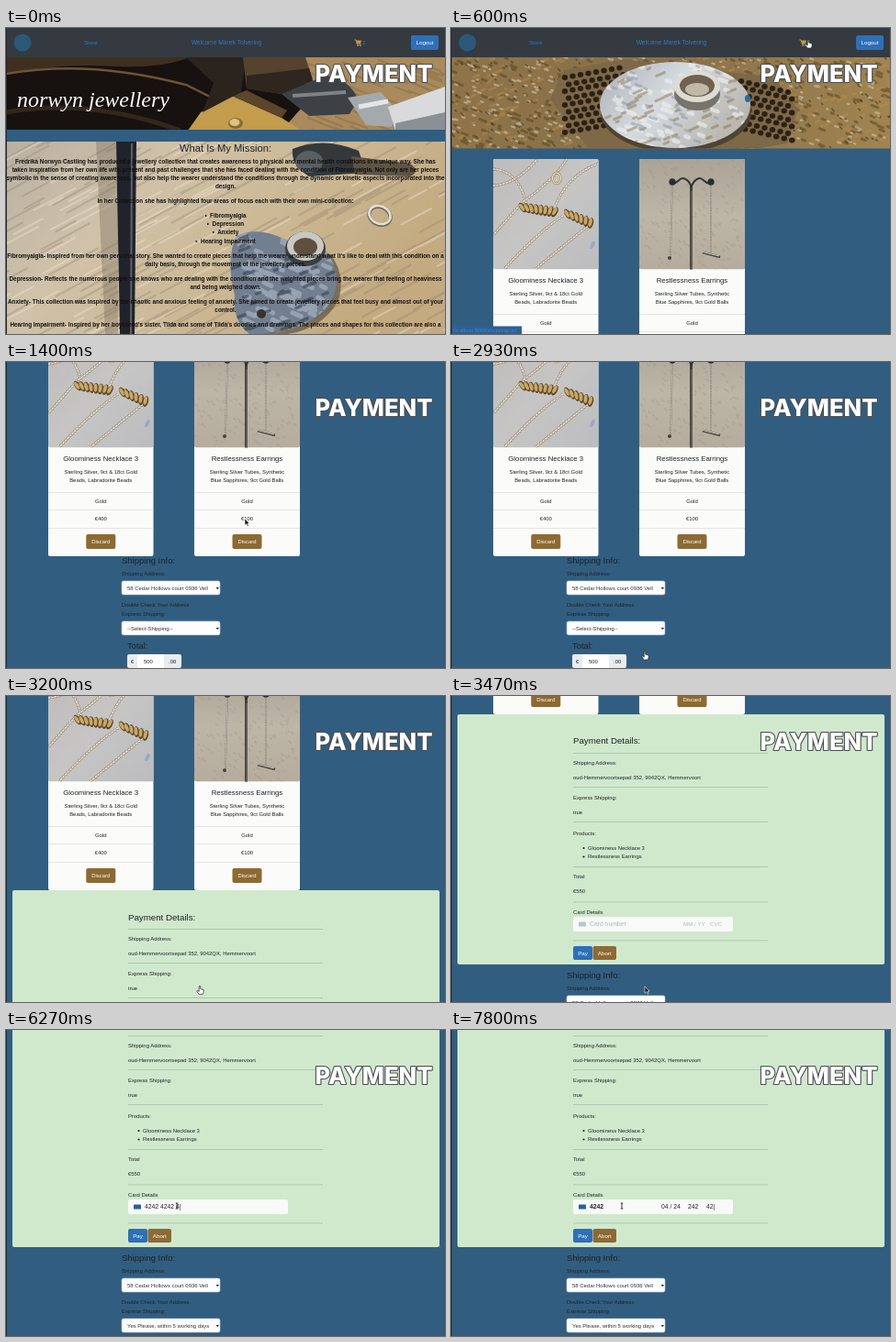
Recreate the animation shown at these times as an HTML page. Size 478 px wide and 334 px high, loop 8000 ms.

```html
<!DOCTYPE html>
<html lang="en">
<head>
<meta charset="utf-8">
<title>Checkout demo</title>
<style>
  html, body { margin: 0; width: 100%; height: 100%; overflow: hidden; background: #315e80; }
  svg { display: block; width: 100%; height: 100%; font-family: "Liberation Sans", sans-serif; }
  text { white-space: pre; }
</style>
</head>
<body>
<svg id="stage" viewBox="0 0 478 334"></svg>
<script>
const LOOP = 8000, STEP = 200 / 3;
const BLUE = '#315e80', BUTTON = '#2d70b8', BROWN = '#8d6a33', INK = '#1d2226';

// Markup helpers; text is placed by its vertical middle.
const text = (x, y, s, size = 5.9, attrs = '') =>
  `<text x="${x}" y="${y + size * 0.36}" font-size="${size}" ${attrs}>${s}</text>`;
const mid = (x, y, s, size, attrs = '') => text(x, y, s, size, `text-anchor="middle" ${attrs}`);
const rect = (x, y, w, h, fill, attrs = '') =>
  `<rect x="${x}" y="${y}" width="${w}" height="${h}" fill="${fill}" ${attrs}/>`;
const oval = (x, y, rx, ry, fill, attrs = '') =>
  `<ellipse cx="${x}" cy="${y}" rx="${rx}" ry="${ry}" fill="${fill}" ${attrs}/>`;
const shape = (d, fill, attrs = '') => `<path d="${d}" fill="${fill}" ${attrs}/>`;
const line = (d, color, width, attrs = '') => shape(d, 'none', `stroke="${color}" stroke-width="${width}" ${attrs}`);
const button = (x, y, w, h, label, fill, size = 5.9) =>
  rect(x, y, w, h, fill, 'rx="2"') + mid(x + w / 2, y + h / 2, label, size, 'fill="#fff"');
const group = (id, body, attrs = '') => `<g id="${id}" ${attrs}>${body}</g>`;
const clipped = (id, body) => `<g clip-path="url(#${id})">${body}</g>`;
const gradient = (id, dir, ...colors) => `<linearGradient id="${id}" ${dir}>` +
  colors.map((c, i) => `<stop offset="${i / (colors.length - 1)}" stop-color="${c}"/>`).join('') + '</linearGradient>';
const clip = (id, area) => `<clipPath id="${id}">${area}</clipPath>`;

function random(seed) {
  return () => (seed = (seed * 16807) % 2147483647) / 2147483647;
}
// Strokes of random length scattered over an area, for grain and mottling.
function strokes(seed, count, [x, y, w, h], [dx, dy], width, color, opacity) {
  const rnd = random(seed * 7919);
  let d = '';
  for (let i = 0; i < count; i++) {
    const k = 0.3 + rnd();
    d += `M${(x + rnd() * w).toFixed(1)} ${(y + rnd() * h).toFixed(1)}l${(dx * k).toFixed(1)} ${(dy * k).toFixed(1)}`;
  }
  return line(d, color, width, `opacity="${opacity}" stroke-linecap="round"`);
}

const header = rect(0, 0, 478, 32, '#343a40') +
  oval(18, 16, 9.5, 9.5, '#2c5878') +
  text(85, 16, 'Store', 6.1, 'fill="#2b7cc9"') +
  mid(240, 16, 'Welcome Marek Tolvering', 6.7, 'fill="#2b7cc9"') +
  line('M379.5 13h1.5l1.5 5h4', '#b8a25a', 1) + shape('M381.5 13.5h5.5l-1 3.5h-3.7z', '#c79a35') +
  oval(383, 19.3, 0.8, 0.8, '#c9b36a') + oval(386, 19.3, 0.8, 0.8, '#c9b36a') +
  text(388, 16, '2', 6, 'fill="#2b7cc9"') +
  button(441, 8, 30, 16, 'Logout', BUTTON, 6.2);

const workshopBanner = clipped('bannerA', rect(0, 32, 478, 80, '#17120f') +
  shape('M0 32H200Q170 44 120 42Q60 38 0 50Z', '#3f2f20') + line('M0 50Q90 34 196 62L240 84', '#6d5433', 2.5) +
  line('M0 92Q90 76 190 112', '#33271c', 5) +
  shape('M318 32H478V112H300L330 78Z', '#a98a5c') +
  strokes(3, 60, [320, 32, 158, 80], [30, 12], 2, '#7d6340', 0.4) +
  shape('M198 112L212 92L246 74L300 98L322 112Z', '#c39c4c') + shape('M246 74L300 98L306 90L262 68Z', '#5b452b') +
  shape('M196 32H262L256 70L214 92L226 60Z', '#2b231d') +
  shape('M258 32H326L334 56L300 72L262 66Z', '#55432f') + shape('M262 52L330 44L334 58L300 72L262 66Z', '#2e261f') +
  oval(250, 104, 8, 6, '#8a6c35') + oval(249, 103, 5.5, 4, '#dcc383') +
  shape('M300 72L348 52Q372 54 384 78L374 94L330 96Z', '#3d4146') + line('M312 74L370 70', '#7d8286', 4) +
  shape('M372 76L408 70L424 88L420 108L392 106Z', '#a4a9ae') + line('M384 86L416 80', '#e4e6e8', 5) +
  shape('M416 86L478 64V112H424Z', '#d9dadb') + shape('M424 104L478 92V112H424Z', '#8b9097') +
  text(12, 77, 'norwyn jewellery', 24, 'fill="#fff" font-family="Liberation Serif, serif" font-style="italic"'));

const PENDANT = 'M251 227Q274 216 302 230L348 243Q364 262 358 290Q346 318 312 328L268 336Q246 322 249 292Q239 250 251 227Z';
const woodPhoto = rect(0, 124, 478, 210, 'url(#wood)') + clipped('photoWood',
  strokes(11, 130, [-30, 124, 508, 250], [55, -30], 2.2, '#8d7d68', 0.32) +
  strokes(12, 110, [-30, 124, 508, 250], [45, -24], 2, '#efe5d2', 0.4) +
  shape('M98 124H122V334H108Z', '#6d6253', 'opacity=".35"') +
  shape('M120 124H142L140 334H124Z', '#20232b') + line('M137 126L136 334', '#5d626b', 2) +
  shape('M312 132Q346 118 384 134L392 158L330 162Q310 150 312 132Z', '#33383b') +
  oval(330, 146, 15, 12, '#596064') + shape('M376 140L440 148Q452 156 440 162L380 160Z', '#5e5444') +
  shape(PENDANT, '#4d4438', 'transform="translate(5 4)" opacity=".6"')) +
  shape(PENDANT, '#727f90') + clipped('pendant',
  strokes(5, 75, [246, 222, 110, 110], [9, 4], 5, '#b3bfcc', 0.55) +
  strokes(6, 50, [246, 222, 110, 110], [8, -3], 3.5, '#38424f', 0.6)) +
  oval(326, 241, 22, 19, '#3b3e40') + oval(326, 238, 20, 16, '#c9c8c1') + oval(326, 239, 13, 10, '#5d503f') +
  oval(278, 312, 5, 5, '#37332e') +
  oval(407, 205, 12, 9.5, 'none', 'stroke="#6f695f" stroke-width="4" transform="rotate(25 407 205)"') +
  oval(407, 204, 12, 9.5, 'none', 'stroke="#e2e0d8" stroke-width="2.6" transform="rotate(25 407 204)"');

const missionLines = [
  [148, 'Fredrika Norwyn Castling has produced a jewellery collection that creates awareness to physical and mental health conditions in a unique way. She has'],
  [157, 'taken inspiration from her own life with present and past challenges that she has faced dealing with the condition of Fibromyalgia. Not only are her pieces'],
  [166, 'symbolic in the sense of creating awareness, but also help the wearer understand the conditions through the dynamic or kinetic aspects incorporated into the'],
  [175, 'design.'],
  [191, 'In her Collection she has highlighted four areas of focus each with their own mini-collection:'],
  [207, '•  Fibromyalgia'], [216, '•  Depression'], [225, '•  Anxiety'], [235, '•  Hearing Impairment'],
  [251, "Fibromyalgia- Inspired from her own personal story. She wanted to create pieces that help the wearer understand what it's like to deal with this condition on a"],
  [260, 'daily basis, through the movement of the jewellery pieces.'],
  [276, 'Depression- Reflects the numerous people she knows who are dealing with the condition and the weighted pieces bring the wearer that feeling of heaviness'],
  [285, 'and being weighed down.'],
  [301, 'Anxiety- This collection was inspired by the chaotic and anxious feeling of anxiety. She aimed to create jewellery pieces that feel busy and almost out of your'],
  [310, 'control.'],
  [326, "Hearing Impairment- Inspired by her boyfriend's sister, Tilda and some of Tilda's doodles and drawings. The pieces and shapes for this collection are also a"],
];
const mission = rect(0, 0, 478, 334, BLUE) + header + workshopBanner + woodPhoto +
  mid(239, 131, 'What Is My Mission:', 11.2, `fill="${INK}"`) +
  missionLines.map(([y, s]) => mid(239, y - 2, s, 6.35, 'font-weight="bold" fill="#111"')).join('');

const holes = (x, y, cols, rows, slope) => {
  let s = '';
  for (let r = 0; r < rows; r++)
    for (let c = 0; c < cols; c++) s += oval(x + c * 8.5 + (r % 2) * 4.2, y + r * 7.5 + c * slope, 3.2, 2.9, '#2b2116');
  return s;
};
const STONE = [0, 32, 478, 100];
const stoneBanner = clipped('bannerB', rect(...STONE, 'url(#stone)') +
  strokes(21, 330, STONE, [5, 2], 3, '#57431f', 0.5) + strokes(22, 260, STONE, [5, -2], 2.6, '#b58a4a', 0.55) +
  strokes(23, 300, STONE, [3, 1], 2.2, '#d9ceb4', 0.55) + strokes(24, 200, STONE, [2, 2], 1.6, '#33260f', 0.5) +
  shape('M108 78L122 46L190 34L352 54L378 88L366 126L330 132H150Z', '#7d6847') +
  holes(124, 54, 8, 9, -1.5) + holes(316, 58, 7, 8, 2) +
  oval(245, 92, 82, 44, '#4f4331') + oval(244, 84, 82, 47, 'url(#silver)') +
  clipped('disc', strokes(8, 80, [165, 40, 160, 92], [8, 3], 4.5, '#f1f2f2', 0.6) +
    strokes(9, 60, [165, 40, 160, 92], [7, -3], 3, '#8b7650', 0.5) +
    strokes(10, 40, [165, 40, 160, 92], [6, 2], 3, '#8a97a8', 0.5)) +
  oval(268, 72, 25, 18, '#77746c') + oval(268, 64, 25, 17, '#dddcd4') + oval(268, 63, 19, 12, '#706250') +
  oval(268, 67, 13, 7, '#c1b9a8') + oval(323, 77, 3, 4, '#2a6c9f'));

const chain = (d, color = '#eee6d2') => line(d, '#8b7f6a', 3, 'stroke-dasharray="2.6 1"') +
  line(d, color, 1.7, 'stroke-dasharray="2.2 1.4"');
const bead = (x, y, tilt) => `<g transform="rotate(${tilt} ${x} ${y})">` +
  oval(x, y, 3, 6, '#5b482b') + oval(x - 0.5, y - 0.7, 1.9, 4.6, '#c9a867') + '</g>';
const beads = (x, y, n, drop, tilt) =>
  Array.from({ length: n }, (_, i) => bead(x + i * 5, y + i * drop, tilt + i * 9)).join('');
const necklacePhoto = clipped('photoA', rect(46, 143, 115, 120.5, 'url(#grey)') +
  chain('M46 172Q72 170 94 143') + chain('M46 154Q74 156 82 192') + chain('M126 143Q112 166 78 190L46 226') +
  chain('M161 148Q126 160 112 198') + chain('M122 205Q96 222 58 263') + chain('M154 212Q132 230 92 263') +
  oval(115, 164, 4.5, 6, 'none', 'stroke="#a3885a" stroke-width="2.4"') +
  oval(115, 164, 4.5, 6, 'none', 'stroke="#efe4c8" stroke-width="1.1"') +
  beads(78, 196, 8, 0.7, -35) + beads(127, 203, 6, 2, -30) +
  oval(154, 237, 2, 4.5, '#97a9c4', 'transform="rotate(25 154 237)"'));
const STAND = 'M240 169C246 172 248 163 253 164Q260 166 261.5 174Q264 166 270 164C275 163 277 172 283 169';
const earringPhoto = clipped('photoB', rect(205, 143, 115, 120.5, 'url(#beige)') +
  strokes(31, 160, [205, 143, 115, 120], [2, 2], 1.5, '#8f887b', 0.25) +
  line('M261.5 172V264', '#44413c', 3) + line('M262 178V264', '#8a8477', 0.8) + line(STAND, '#343432', 2) +
  oval(241, 168, 3.6, 3.8, '#2b2c2d') + oval(283, 168, 3.6, 3.8, '#2b2c2d') +
  line('M241 172L239 249M283 172L283 246', '#7d776b', 1.8, 'stroke-dasharray="2.4 .8"') +
  line('M241 172L239 249M283 172L283 246', '#ddd7ca', 0.8, 'stroke-dasharray="2 1.2"') +
  oval(238, 251, 2, 2, '#45433e') + line('M274 245L293 250', '#45433e', 2.6) + line('M274 244.5L292 249', '#d0ccc0', 1));

const card = (x, w, photo, title, rows, price) => {
  const c = x + w / 2;
  return rect(x, 143, w, 239, '#fbfbf9', 'rx="2"') + photo +
    mid(c, 275.5, title, 7.8, `fill="${INK}"`) +
    mid(c, 289.5, rows[0]) + mid(c, 299, rows[1]) +
    [312, 331, 351].map(y => rect(x, y, w, 0.7, '#dcdcda')).join('') +
    mid(c, 321.5, 'Gold') + mid(c, 341, price) + button(c - 16, 358, 32, 16, 'Discard', BROWN);
};

const select = (y, id, value) =>
  rect(126, y, 107, 15, '#fdfdfd', `id="${id}Box" rx="2" stroke="#b9c8d4" stroke-width=".6"`) +
  text(132, y + 7.5, value, 5.95, `id="${id}" fill="#333"`) + shape(`M228.5 ${y + 7}h3.6l-1.8 2.2z`, '#333');
const form = text(126, 217, 'Shipping Info:', 9.5) + text(126, 231, 'Shipping Address:') +
  select(239, 'address', '58 Cedar Hollows court 0936 Vell') +
  text(126, 265, 'Double Check Your Address') + text(126, 274.5, 'Express Shipping:') +
  select(283, 'express', '--Select-Shipping--') +
  text(132, 310, 'Total:', 9.4) +
  rect(132, 319, 59, 15, '#e9ecef', 'rx="2"') + rect(143, 319, 29, 15, '#fff') +
  text(136, 326.5, '€') + text(150, 326.5, '500', 5.9, 'id="total"') + text(177, 326.5, '.00');

const hr = y => rect(133, y, 212, 0.8, '#a9bea9');
const modal = rect(7, -36, 465, 273, '#d0e9cd', 'rx="2"') +
  text(133, -7, 'Payment Details:', 9.7) + [6, 43, 81, 130, 168.5, 210.5].map(hr).join('') +
  text(133, 17, 'Shipping Address:') + text(133, 32.5, 'oud-Hemmervoortsepad 352, 9042QX, Hemmervoort') +
  text(133, 55, 'Express Shipping:') + text(133, 71, 'true') + text(133, 94, 'Products:') +
  oval(144.5, 110, 1.1, 1.1, INK) + text(149, 109.5, 'Gloominess Necklace 3') +
  oval(144.5, 119.5, 1.1, 1.1, INK) + text(149, 119, 'Restlessness Earrings') +
  text(133, 141, 'Total') + text(133, 157, '€550') + text(133, 180, 'Card Details') +
  rect(133, 185, 174, 16, '#f8faf8', 'rx="2"') + rect(139, 190.5, 8, 5, '#b3c9d4', 'id="brand" rx=".6"') +
  text(151, 193, '', 6.8, 'id="number"') + text(229, 193, '', 6.8, 'id="expiry"') +
  text(258, 193, '', 6.8, 'id="cvc"') + text(278, 193, '', 6.8, 'id="zip"') +
  button(133, 217, 21, 15, 'Pay', BUTTON, 6.2) + button(154.5, 217, 25.5, 15, 'Abort', BROWN, 6.2);

const shop = rect(0, 0, 478, 1000, BLUE) + header + stoneBanner +
  card(46, 114.5, necklacePhoto, 'Gloominess Necklace 3', ['Sterling Silver, 9ct &amp; 18ct Gold', 'Beads, Labradorite Beads'], '€400') +
  card(205, 115, earringPhoto, 'Restlessness Earrings', ['Sterling Silver Tubes, Synthetic', 'Blue Sapphires, 9ct Gold Balls'], '€100') +
  group('form', form) + group('modal', modal, 'transform="translate(0 418)"');

const options = rect(126, 298, 107, 33, '#fff', 'stroke="#9aa6b0" stroke-width=".6"') +
  rect(126, 309, 107, 11, '#2f77c6') + text(132, 303.5, '--Select-Shipping--') +
  text(132, 314.5, 'Yes Please, within 5 working days', 5.95, 'fill="#fff"') + text(132, 325.5, 'No Thank You');

const pointers = group('arrow', shape('M0 0V7.2L1.8 5.7L3 8.3L4.2 7.8L3 5.2H5.2Z', '#111', 'stroke="#fff" stroke-width=".6"')) +
  group('hand', shape('M-.8 0h1.5v3l3.4 1v3l-1 2h-4l-2.4-3.6l1-.6l1.5 1.2z', '#fff', 'stroke="#222" stroke-width=".7"')) +
  group('beam', line('M-1.3-3H1.3M0-3V3M-1.3 3H1.3', '#222', 0.9));

document.getElementById('stage').innerHTML = '<defs>' +
  gradient('wood', 'x2="1" y2=".4"', '#b9b0a3', '#d0c2a9', '#cbb894', '#c3aa80') +
  gradient('stone', 'x2="1"', '#8f7448', '#86704a', '#a18450') +
  gradient('silver', 'x2="1" y2=".5"', '#a9b0b7', '#d5dade', '#b9b7b0') +
  gradient('grey', 'x2="1" y2="1"', '#bdbcbb', '#c6c5c4', '#bcbcbf') +
  gradient('beige', 'x2="0" y2="1"', '#aaa496', '#bdb5a6', '#b5ac9d') +
  clip('bannerA', rect(0, 32, 478, 79)) + clip('bannerB', rect(0, 32, 478, 99.5)) +
  clip('photoWood', rect(0, 124, 478, 210)) + clip('pendant', shape(PENDANT)) + clip('disc', oval(244, 84, 82, 47)) +
  clip('photoA', rect(46, 143, 114.5, 120.5, '', 'rx="2"')) + clip('photoB', rect(205, 143, 115, 120.5, '', 'rx="2"')) + '</defs>' +
  `<g fill="${INK}">` + group('mission', mission) + group('shop', shop) + group('options', options) + '</g>' +
  group('status', rect(0, 325.5, 77, 8.5, '#2c6096') + text(2, 330, 'localhost:8080/shoppingcart', 5.6, 'fill="#3d86cc"')) +
  rect(0, 0, 1, 334, '#232a30') +
  mid(400.5, 50, 'PAYMENT', 25.6, 'font-family="Inter, sans-serif" font-weight="800" fill="#fff" stroke="#4a4e50" stroke-width="2.2" stroke-linejoin="round" paint-order="stroke"') +
  group('cursor', pointers);

const el = Object.fromEntries([...document.querySelectorAll('#stage [id]')].map(e => [e.id, e]));
const show = (id, on) => el[id].setAttribute('display', on ? 'inline' : 'none');
const move = (id, x, y) => el[id].setAttribute('transform', `translate(${x} ${y})`);

// Eased interpolation through [time, ...values] keys.
function follow(keys, t) {
  const i = keys.findIndex(k => k[0] > t);
  if (i < 0) return keys[keys.length - 1].slice(1);
  if (i === 0) return keys[0].slice(1);
  const [a, b] = [keys[i - 1], keys[i]];
  const u = (t - a[0]) / (b[0] - a[0]), e = u * u * (3 - 2 * u);
  return a.slice(1).map((v, k) => v + (b[k + 1] - v) * e);
}
const scrollKeys = [[930, 0], [1330, 170], [3333, 170], [3466, 362], [3700, 418]];
const cursorKeys = [[66, 330, 120], [400, 389, 13], [660, 389, 13], [900, 260, 171], [1400, 260, 171],
  [1730, 233, 288], [1870, 233, 288], [2000, 236, 289], [2130, 234, 289], [2270, 234, 289],
  [2730, 211, 316], [3530, 211, 317], [4200, 181, 186], [4660, 181, 186], [4870, 186, 192]];

function typeCard(t) {
  const n = Math.max(0, Math.floor((t - 5380) / 96));
  const caret = '|', full = n >= 16;
  const set = (id, value, hint) => {
    el[id].textContent = value || hint;
    el[id].setAttribute('fill', value ? '#222' : '#a8b9bd');
  };
  const part = (s, from, size) => s.slice(0, Math.max(0, n - from)) + (n >= from && n < from + size ? caret : '');
  const digits = '4242'.repeat(4).slice(0, n).replace(/(.{4})(?=.)/g, '$1 ');
  set('number', full ? '4242' : n ? digits + caret : '', 'Card number');
  el.number.setAttribute('font-weight', full ? 'bold' : 'normal');
  const date = part('0424', 16, 4).replace(/^(\d\d)(?=.)/, '$1 / ');
  set('expiry', full ? date : '', n ? '' : 'MM / YY');
  set('cvc', full ? part('242', 20, 3) : '', n && !full ? '' : 'CVC');
  set('zip', n >= 23 ? '42'.slice(0, n - 23) + caret : '', full ? 'ZIP' : '');
  el.expiry.setAttribute('x', full ? 229 : 253);
  el.cvc.setAttribute('x', full ? 258 : 282);
  for (const id of ['expiry', 'cvc']) el[id].setAttribute('font-size', n ? 6.8 : 6.2);
  el.brand.setAttribute('fill', n ? '#2a5f9e' : '#b3c9d4');
}

function draw(time) {
  const t = Math.floor((time % LOOP) / STEP + 0.01) * STEP;
  const onShop = t >= 395, chosen = t >= 3000, paying = t >= 3130;
  const [scroll] = follow(scrollKeys, t);
  show('mission', !onShop);
  show('shop', onShop);
  show('modal', paying);
  show('options', t >= 2260 && t < 2660);
  show('status', t >= 330 && t < 700);
  move('shop', 0, -scroll);
  move('form', 0, paying ? 450 : 170);
  el.express.textContent = chosen ? 'Yes Please, within 5 working days' : '--Select-Shipping--';
  el.total.textContent = chosen ? '550' : '500';
  el.expressBox.setAttribute('stroke', t >= 2260 && !paying ? '#6fb2f5' : '#b9c8d4');
  typeCard(t);

  const beam = t >= 4790, hand = (t >= 330 && t < 700) || (t >= 2800 && t < 3400);
  show('cursor', t > 60);
  show('beam', beam);
  show('hand', hand);
  show('arrow', !beam && !hand);
  move('cursor', ...follow(cursorKeys, t));
}

const start = performance.now();
function tick() {
  draw(performance.now() - start);
  requestAnimationFrame(tick);
}
tick();
</script>
</body>
</html>
```
